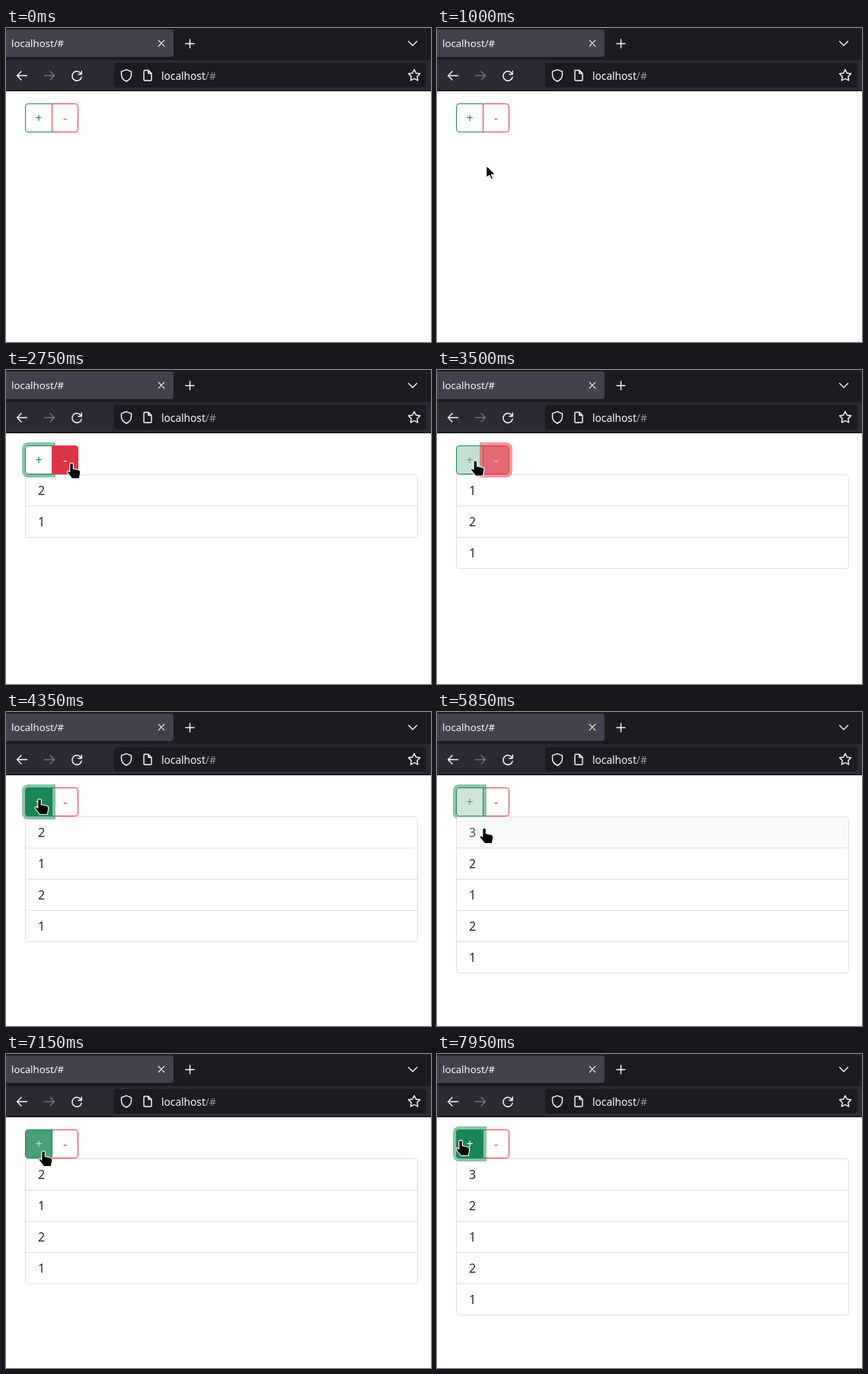
An HTML page for the animation above (8 s loop, 558 px wide and 412 px high).

```html
<!DOCTYPE html>
<html lang="en">
<head>
<meta charset="utf-8">
<title>Counter</title>
<style>
  html, body { margin: 0; width: 100%; height: 100%; overflow: hidden; background: #fff; }
  body { position: relative; font: 16px/24px "Noto Sans", "Open Sans", sans-serif; color: #212529; }
  svg { position: absolute; left: 0; top: 0; }
  #pointer { z-index: 5; }
  .btn, .row { position: absolute; box-sizing: border-box; border: 1px solid; }
  .btn { top: 99px; height: 38px; padding: 6px 0; text-align: center; }
  #plus { left: 25px; width: 36px; border-color: #198754; border-radius: 4px 0 0 4px; }
  #minus { left: 60px; width: 35px; border-color: #dc3545; border-radius: 0 4px 4px 0; }
  .row { left: 25px; width: 516px; height: 42px; padding: 8px 16px; background: #fff; border-color: #dfdfdf; }
  .row:first-child { border-radius: 4px 4px 0 0; }
  .row:last-child { border-radius: 0 0 4px 4px; }
  .row:only-child { border-radius: 4px; }
  .row.hover { background: #f8f9fa; color: #495057; z-index: 1; }
</style>
</head>
<body>
<svg width="558" height="83" fill="none" stroke="#fbfbfe" stroke-width="1.4" stroke-linecap="round" stroke-linejoin="round">
  <g stroke="none">
    <path fill="#1c1b22" d="M0 0H558V42H0z"/>
    <path fill="#2b2a33" d="M0 42H558V82H0z"/>
    <path fill="#0c0c0d" d="M0 82H558V83H0z"/>
    <rect fill="#42414d" x="-2" y="2" width="222" height="36" rx="4"/>
    <rect fill="#1c1b22" x="142" y="46" width="410" height="32" rx="4"/>
    <g fill="#fbfbfe" font-family="Noto Sans, Open Sans, sans-serif">
      <text x="7" y="25" font-size="13.2">localhost/#</text>
      <text x="204" y="68" font-size="13.7">localhost<tspan fill="#98979d">/#</tspan></text>
    </g>
  </g>
  <path d="M200.2 16.2l7.6 7.6m0-7.6l-7.6 7.6" stroke-width="1.2"/>
  <path d="M236 20.5h11M241.500 15v11M528.500 17.500l5.500 5.500 5.500-5.500"/>
  <path d="M27.500 62.500h-13m5.500-5.500l-5.500 5.500 5.500 5.500"/>
  <path d="M50.500 62.500h13m-5.500-5.500l5.500 5.500-5.500 5.500" stroke="#76757c"/>
  <path d="M98.500 60a6.200 6.200 0 1 0 .6 4.500M99.300 56.500v4.300h-4.300"/>
  <path d="M158 54.700l6.500 2.400v4.200c0 4-2.700 7-6.500 8.700c-3.800-1.700-6.500-4.700-6.500-8.700v-4.200z"/>
  <path d="M182 55.500h5l4 4v8.500q0 1-1 1h-8q-1 0-1-1v-11.500q0-1 1-1zm5 0v4h4"/>
  <path id="star"/>
</svg>
<div id="plus" class="btn">+</div>
<div id="minus" class="btn">-</div>
<div id="list"></div>
<svg id="pointer" width="558" height="412">
  <path id="cursor" fill="#000" stroke="#fff" stroke-width="1.2" stroke-linejoin="round"/>
</svg>
<script>
const LOOP = 8000, FADE = 150, SAMPLES = 30;
const HAND = 'M-2.200 2C-2.200-.6 2.400-.6 2.400 2V7.500L9.500 9Q12 9.600 11.800 12.500L10.300 20.500H.5L-5.500 13Q-6.500 10.500-4 10.200L-2.200 11.800Z';
const ARROW = 'M0 0V16.500L4 13 6.500 18.500 9 17.300 6.600 12H12Z';

// Pointer tip: time, x, y
const path = [
  [50, 120, 295], [850, 75, 203], [1250, 43, 132], [1500, 42, 122], [2350, 43, 121],
  [2700, 86, 122], [3250, 86, 121], [3700, 25, 117], [4000, 44, 114], [4450, 44, 114],
  [4800, 64, 266], [4950, 64, 264], [5300, 44, 122], [5650, 44, 122], [5850, 62, 152],
  [6000, 66, 158], [6500, 66, 158], [6850, 60, 263], [7090, 49, 127], [7150, 49, 127],
  [7400, 42, 120], [7950, 31, 113]
];
const history = [[0, ''], [1500, '1'], [2100, '21'], [3000, '121'], [4050, '2121'],
  [5500, '32121'], [6350, '2121'], [7700, '32121']];
const focus = [[0, ''], [1400, 'plus'], [2920, 'minus'], [3960, 'plus'], [6280, ''], [7570, 'plus']];
const buttons = { plus: { x: 25, rgb: [25, 135, 84] }, minus: { x: 60, rgb: [220, 53, 69] } };

const $ = id => document.getElementById(id);
const ease = k => k * k * (3 - 2 * k);
const stateAt = (steps, t) => steps.findLast(s => s[0] <= t)?.[1] ?? '';

function pointerAt(t) {
  if (t < path[0][0]) return { x: -99, y: -99 };
  const i = path.findLastIndex(p => p[0] <= t);
  const [t0, x0, y0] = path[i], [t1, x1, y1] = path[i + 1] || [LOOP, x0, y0];
  const k = ease((t - t0) / (t1 - t0));
  return { x: x0 + (x1 - x0) * k, y: y0 + (y1 - y0) * k };
}

function hovers(id, t) {
  const { x, y } = pointerAt(t), left = buttons[id].x;
  return x >= left && x < left + 35 && y >= 99 && y < 137;
}

// Share of the last FADE ms in which a condition held, eased like a CSS transition
function faded(test, t) {
  let on = 0;
  for (let i = 0; i < SAMPLES; i++) on += test(t - i * FADE / SAMPLES);
  return ease(on / SAMPLES);
}

function drawButton(id, t) {
  const { rgb } = buttons[id], style = $(id).style;
  const hover = faded(u => hovers(id, u), t);
  const ring = faded(u => stateAt(focus, u) === id, t);
  const mix = k => `rgb(${rgb.map(c => c + (255 - c) * k)})`;
  style.background = `rgba(${rgb},${hover})`;
  style.color = mix(hover);
  style.boxShadow = `0 0 0 ${4 * ring}px rgba(${rgb},${ring / 2})`;
  style.zIndex = hovers(id, t) || stateAt(focus, t) === id ? 1 : 0;
}

let shown = '';
function drawList(values, hovered) {
  if (values !== shown) {
    $('list').innerHTML = [...values].map((v, i) =>
      `<div class="row" style="top:${137 + 41 * i}px">${v}</div>`).join('');
    shown = values;
  }
  [...$('list').children].forEach((row, i) => row.classList.toggle('hover', i === hovered));
}

function frame(now) {
  const t = now % LOOP, { x, y } = pointerAt(t), values = stateAt(history, t);
  const row = x >= 25 && x < 541 && y >= 137 ? Math.floor((y - 137) / 41) : -1;
  const link = hovers('plus', t) || hovers('minus', t) || (row >= 0 && row < values.length);
  drawButton('plus', t);
  drawButton('minus', t);
  drawList(values, row);
  $('cursor').setAttribute('d', link ? HAND : ARROW);
  $('cursor').setAttribute('transform', `translate(${x} ${y})`);
  requestAnimationFrame(frame);
}

const starPoints = Array.from({ length: 10 }, (_, i) => {
  const a = i * Math.PI / 5, r = i % 2 ? 4 : 8;
  return `${536 + r * Math.sin(a)} ${62.5 - r * Math.cos(a)}`;
});
$('star').setAttribute('d', `M${starPoints.join('L')}Z`);
requestAnimationFrame(frame);
</script>
</body>
</html>
```
